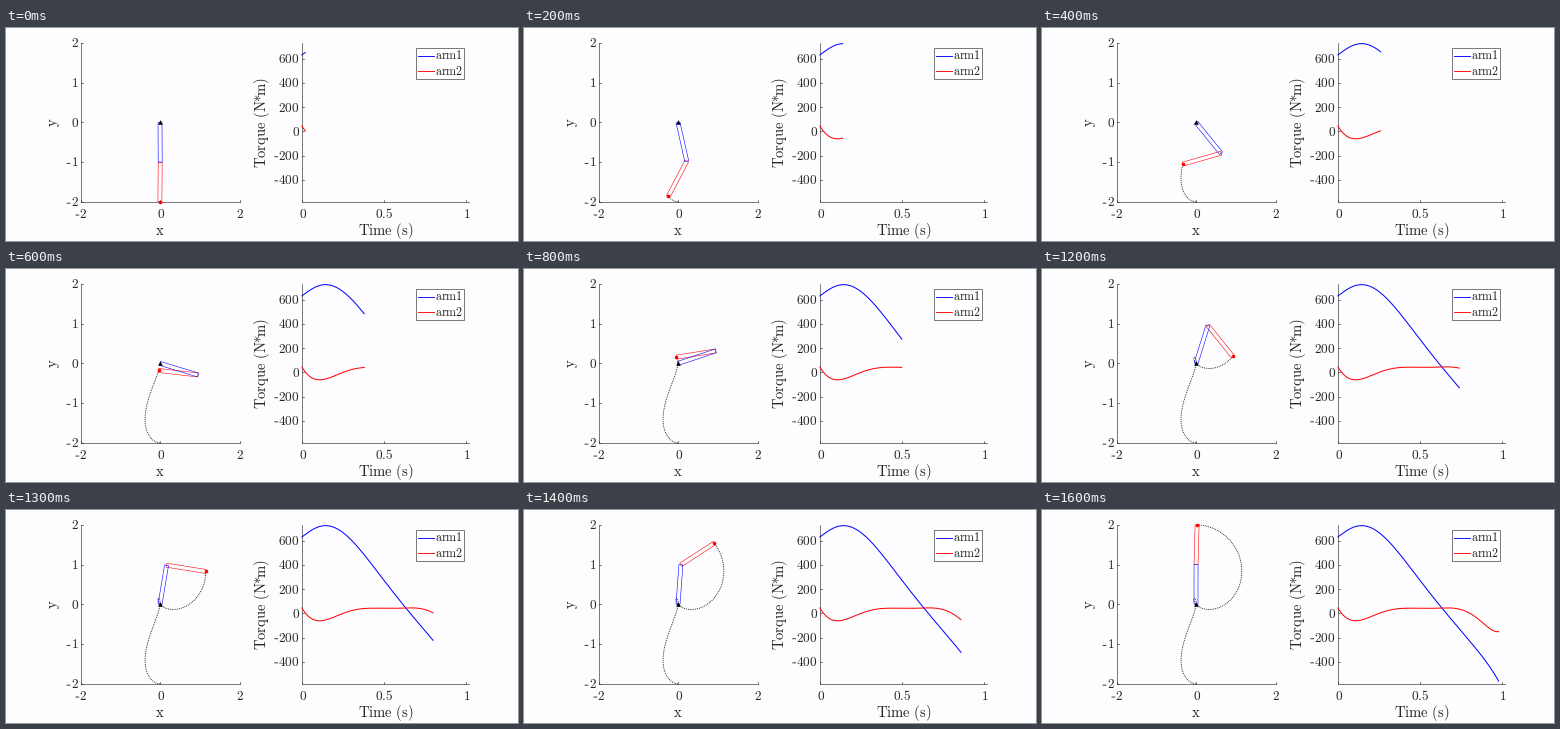
These frames come from a looping animation (512x213 px, 1700 ms). A matplotlib script:

```python
import numpy as np
import matplotlib.pyplot as plt
from matplotlib.animation import FuncAnimation
from matplotlib.patches import Polygon, Rectangle
from numpy.polynomial import Chebyshev

W, H, DPI = 512, 213, 64
PT = 72 / DPI                      # points per pixel
FRAMES, INTERVAL = 17, 100
T_END = 0.98
INK, BLUE, RED, PAPER = "#262626", "#0000ff", "#ff0000", "#fdfcff"
EM, EM_LABEL, EM_LEGEND = 13.33, 14.67, 12
TOP, BOTTOM = 15, 173.6

plt.rcParams["mathtext.fontset"] = "cm"
fig = plt.figure(figsize=(W / DPI, H / DPI), dpi=DPI, facecolor=PAPER)
ax = fig.add_axes([0, 0, 1, 1])
ax.set_xlim(0, W)
ax.set_ylim(H, 0)
ax.axis("off")


def arm_px(x, y):
    return 154 + 39.75 * x, 94.4 - 39.75 * y


def plot_px(t, torque):
    return 295.9 + 164 * t, 103.4 - 0.1205 * torque


def line(xs, ys, color=INK, px=0.6, **kw):
    return ax.plot(xs, ys, color=color, lw=px * PT, **kw)[0]


def text(x, y, s, em, ha="center", **kw):
    ax.text(x, y, f"${s}$", fontsize=em * PT, ha=ha, va="baseline",
            color=INK, rotation_mode="anchor", **kw)


def tick_label(x, y, value, ha):
    """Number with a short hyphen as its minus sign."""
    digits = f"{abs(value):g}"
    width = EM * sum(0.278 if c == "." else 0.5 for c in digits)
    dash = EM / 3 if value < 0 else 0
    left = x - (width + dash) * (1 if ha == "right" else 0.5)
    text(left + dash, y, rf"\mathrm{{{digits}}}", EM, ha="left")
    if dash:
        ax.add_patch(Rectangle((left + 0.6, y - 3.4), 3.6, 0.9, fc=INK, lw=0,
                               snap=False))


def draw_axes(x0, x1, to_px, xticks, yticks):
    line([x0, x0, x1], [TOP, BOTTOM, BOTTOM])
    for v in xticks:
        x = to_px(v, 0)[0]
        line([x, x], [BOTTOM, BOTTOM - 1.7])
        tick_label(x, 190, v, "center")
    for v in yticks:
        y = to_px(0, v)[1]
        line([x0, x0 + 1.7], [y, y])
        tick_label(x0 - 3.8, y + 4.2, v, "right")


def angles(t):
    """Shoulder and relative elbow angle in degrees; at rest at both ends."""
    bump = (t * (1 - t)) ** 2
    u = t - 0.5
    shoulder = -90 + 180 * (3 * t**2 - 2 * t**3 + bump * (1.02 + 1.22 * t))
    elbow = -bump * np.polyval([-22000, 8200, 4300, 130, 3028], u)
    return shoulder, elbow


def joints(t):
    q1, q2 = np.radians(angles(t))
    mid = np.array([np.cos(q1), np.sin(q1)])
    return mid, mid + np.array([np.cos(q1 + q2), np.sin(q1 + q2)])


def link(a, b, half=0.05):
    d = b - a
    n = half * np.array([-d[1], d[0]])
    return np.column_stack(arm_px(*np.array([a + n, b + n, b - n, a - n]).T))


def torque_curve(*values):
    """Polynomial through values at evenly turned (Chebyshev) times."""
    n = len(values)
    t = T_END / 2 * (1 - np.cos((np.arange(n) + 0.5) * np.pi / n))
    return Chebyshev.fit(t, values, n - 1, domain=[0, T_END])


torque1 = torque_curve(644, 708, 700, 462, 126, -163, -389, -539)
torque2 = torque_curve(25, -57, -18, 42, 43, 27, -95, -152)

draw_axes(75, 233.5, arm_px, (-2, 0, 2), (-2, -1, 0, 1, 2))
draw_axes(296, 462.5, plot_px, (0, 0.5, 1), range(-400, 601, 200))
text(154, 207.4, r"\mathrm{x}", EM_LABEL)
text(51, 94.5, r"\mathrm{y}", EM_LABEL, rotation=90)
text(379.2, 207.4, r"\mathrm{Time\ (s)}", EM_LABEL)
text(260, 94.5, r"\mathrm{Torque\ (N\;\,m)}", EM_LABEL, rotation=90)
text(255.8, 69.7, r"\ast", EM_LABEL, rotation=90)

ax.add_patch(Rectangle((410, 20), 48, 31, fc="white", ec=INK, lw=0.6 * PT))
for y, color, name in ((28, BLUE, "arm1"), (43.2, RED, "arm2")):
    line([411.5, 428], [y, y], color, 0.9)
    text(429, y + 3.4, rf"\mathrm{{{name}}}", EM_LEGEND, ha="left")

curve1 = line([], [], BLUE, 1, zorder=3)
curve2 = line([], [], RED, 1, zorder=3)
trail = line([], [], "black", 0.85, ls=(0, (1, 1.2)), zorder=3)
arm1, arm2 = (
    ax.add_patch(Polygon(np.zeros((4, 2)), fill=False, ec=color,
                         lw=0.55 * PT, zorder=z))
    for color, z in ((BLUE, 5), (RED, 4)))
tip = line([], [], RED, marker="o", ms=3.6 * PT, mew=0, zorder=6)
line(*[[v] for v in arm_px(0, 0)], "black", marker="^", ms=4.6 * PT,
     mew=0, zorder=7)


def update(i):
    now = 0.02 + 0.06 * i
    t = np.linspace(0, now, 12 * (i + 1))
    curve1.set_data(*plot_px(t, torque1(t)))
    curve2.set_data(*plot_px(t, torque2(t)))
    trail.set_data(*arm_px(*joints(t)[1]))
    mid, end = joints(now)
    arm1.set_xy(link(np.zeros(2), mid))
    arm2.set_xy(link(mid, end))
    x, y = arm_px(*end)
    tip.set_data([x], [y])
    return curve1, curve2, trail, arm1, arm2, tip


anim = FuncAnimation(fig, update, frames=FRAMES, interval=INTERVAL,
                     repeat=True, repeat_delay=0, blit=False)
plt.show()
```
